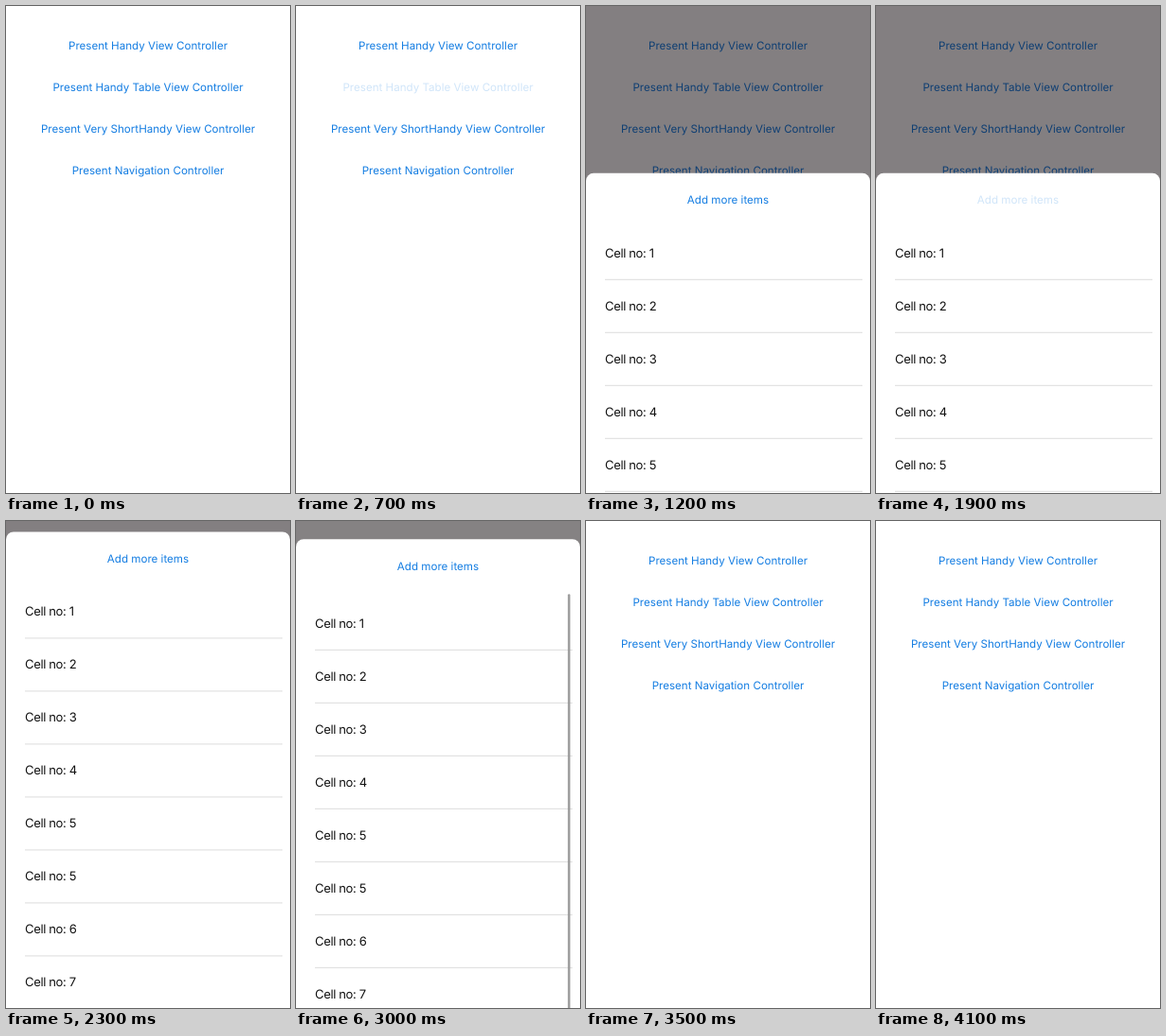
An HTML page with a canvas for the animation above (4.5 s loop, 300 by 515 pixels).

```html
<!DOCTYPE html>
<html lang="en">
<head>
<meta charset="utf-8">
<title>Sheet presentation</title>
<style>
  html, body { margin: 0; width: 100%; height: 100%; overflow: hidden; background: #fff; }
  canvas { display: block; }
</style>
</head>
<body>
<canvas id="stage" width="300" height="515"></canvas>
<script>
const ctx = document.getElementById('stage').getContext('2d');
const W = 300, H = 515, LOOP = 4500, STEP = 100;
const BLUE = '#147de2', DIM = 0.5;
const SHORT_TOP = 176.8, TALL_TOP = 11.4, HEADER = 56, ROW = 56;
const buttons = ['Handy View', 'Handy Table View', 'Very ShortHandy View', 'Navigation'];
const cells = [1, 2, 3, 4, 5, 5, 6, 7];

const progress = (t, from, to) => Math.min(1, Math.max(0, (t - from) / (to - from)));
const easeOut = (u, power = 2) => 1 - (1 - u) ** power;
const smooth = u => u * u * (3 - 2 * u);
const mix = (a, b, p) => a + (b - a) * p;

// A tapped button drops to 20% and then fades back in.
const tapAlpha = (t, down, release, end) => t < down ? 1 : mix(0.2, 1, progress(t, release, end));

function text(string, x, y, size, color, align, alpha = 1) {
  ctx.font = `${size}px Inter, "Liberation Sans", sans-serif`;
  ctx.textRendering = 'geometricPrecision';
  ctx.letterSpacing = align === 'left' ? '-0.35px' : '0px';
  ctx.textAlign = align;
  ctx.globalAlpha = alpha;
  ctx.fillStyle = color;
  ctx.fillText(string, x, y);
  ctx.globalAlpha = 1;
}

const button = (label, y, alpha) => text(label, W / 2, y + 4, 11.6, BLUE, 'center', alpha);

function drawTable(top, overscroll, grown) {
  ctx.save();
  ctx.beginPath();
  ctx.rect(0, top + HEADER, W, H);
  ctx.clip();
  cells.forEach((number, i) => {
    const y = top + HEADER + overscroll + i * ROW;
    const alpha = i < 5 ? 1 : grown;
    text(`Cell no: ${number}`, 20, y + 33, 13, '#111', 'left', alpha);
    ctx.globalAlpha = alpha;
    ctx.fillStyle = '#dcdcdc';
    ctx.fillRect(20, y + ROW, 272, 1);
    ctx.globalAlpha = 1;
  });
  if (overscroll > 0) {
    ctx.fillStyle = '#999';
    ctx.beginPath();
    ctx.roundRect(287.2, top + HEADER + 2, 2.4, H, 1.2);
    ctx.fill();
  }
  ctx.restore();
}

function draw(t) {
  const shown = easeOut(progress(t, 899, 1200));
  const grown = easeOut(progress(t, 1980, 2300));
  const closed = smooth(progress(t, 2960, 3500));
  const openTop = mix(mix(H, SHORT_TOP, shown), TALL_TOP, grown);
  const top = mix(openTop, H, closed);
  const overscroll = 93 * Math.sin(Math.PI * closed);
  const dim = DIM * easeOut(progress(t, 800, 1200), 6) * (1 - closed) ** 1.5;

  ctx.fillStyle = '#fff';
  ctx.fillRect(0, 0, W, H);
  buttons.forEach((name, i) =>
    button(`Present ${name} Controller`, 42 + 44 * i, i === 1 ? tapAlpha(t, 700, 800, 1000) : 1));
  ctx.fillStyle = `rgba(8, 0, 4, ${dim})`;
  ctx.fillRect(0, 0, W, H);

  if (top >= H) return;
  ctx.fillStyle = '#fff';
  ctx.beginPath();
  ctx.roundRect(0, top, W, H, 8);
  ctx.fill();
  button('Add more items', top + 28.4, tapAlpha(t, 1900, 1950, 2150));
  drawTable(top, overscroll, grown);
}

function tick() {
  const t = performance.now() % LOOP;
  draw(Math.floor(t / STEP) * STEP);
  requestAnimationFrame(tick);
}
tick();
</script>
</body>
</html>
```
